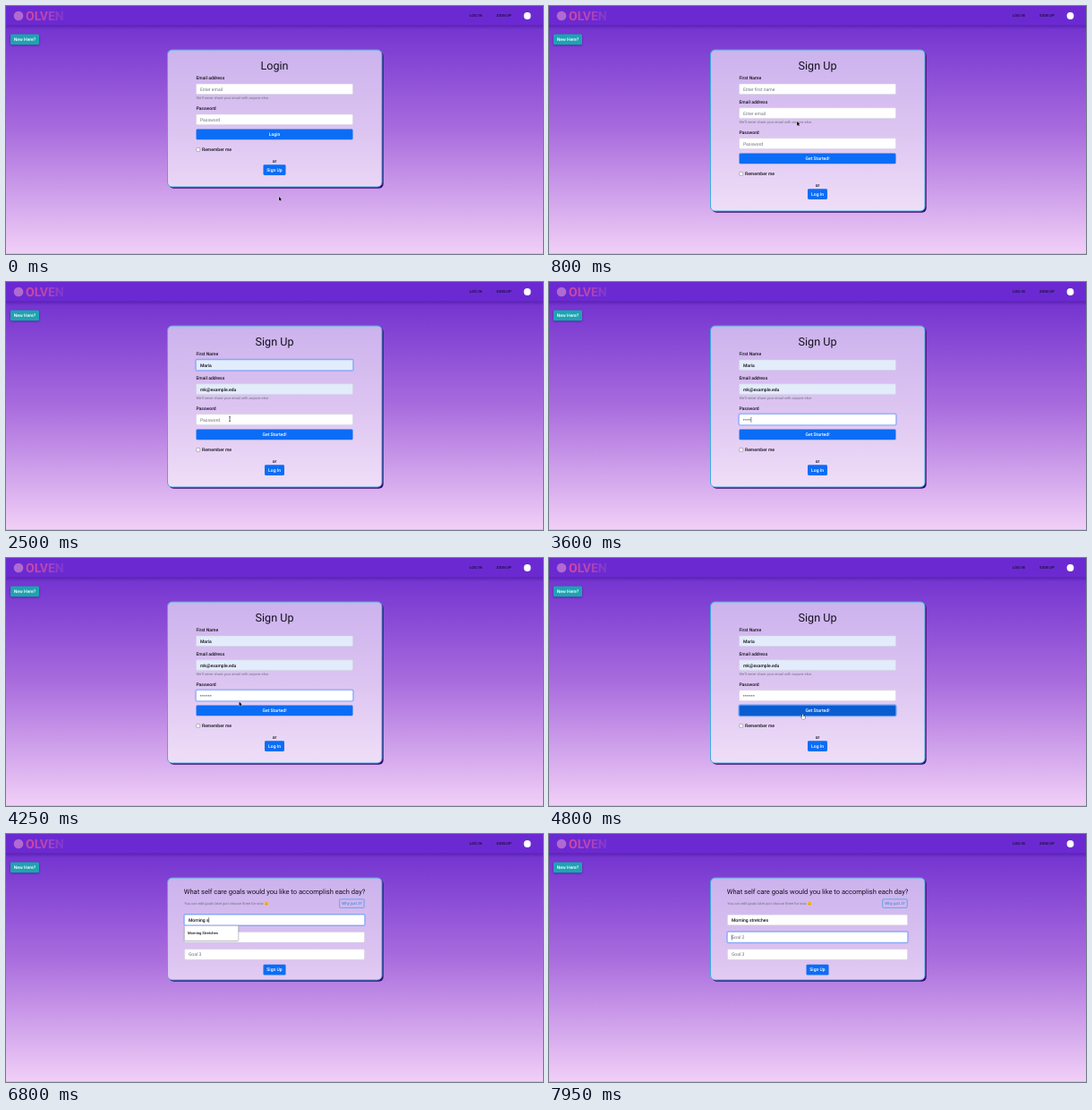
Animation, 600 px wide and 277 px high, one loop 8000 ms. Source, as an HTML page with a canvas:

```html
<!DOCTYPE html>
<html lang="en">
<head>
<meta charset="utf-8">
<title>Sign up flow</title>
<style>
html, body { margin: 0; width: 100%; height: 100%; overflow: hidden; }
canvas { display: block; width: 600px; height: 277px; }
</style>
</head>
<body>
<canvas id="stage"></canvas>
<script>
const W = 600, H = 277, LOOP = 8000;
const REM = 5.04;
const canvas = document.getElementById('stage');
const ctx = canvas.getContext('2d');
const dpr = window.devicePixelRatio || 1;
canvas.width = W * dpr;
canvas.height = H * dpr;
ctx.scale(dpr, dpr);
ctx.textRendering = 'geometricPrecision';

const INK = '#15101c', GREY = '#6c757d', BLUE = '#0b6df5', BLUE_DARK = '#0a58ca';
const AUTOFILL = '#e3ecfb', WHITE = '#fff';

const NAME = 'Maria', EMAIL = 'mk@example.edu';
const GOAL = 'Morning stretches';
const HINTS = ['Morning Stretches', 'Stretch', 'Get pets', 'blah', 'sfd', 'Eat'];

// Times of the user's actions, in ms
const T = {
  signUpPage: 500, nameFocus: 1000, preview: 1200, secondRow: 1400, chosen: 1850,
  passFocus: 2600, passType: 3010, passStep: 180,
  hover: 4400, press: 4600, goalsPage: 4950, goalFocus: 5450,
  goalType: 6000, goalStep: 95, tab: 7750
};

// Pointer stops: time, x, y
const PATH = [
  [0, 305, 213], [300, 301, 184], [600, 301, 184], [950, 262, 94], [1050, 262, 94],
  [1500, 260, 131.5], [1900, 260, 131.5], [2450, 250, 153], [4100, 250, 154],
  [4500, 283, 174.5], [4950, 283, 174.5], [5400, 267.5, 99], [LOOP, 267.5, 99]
];

const backdrop = ctx.createLinearGradient(0, 0, 0, H);
[[0, '#692bd1'], [.1, '#7636d1'], [.5, '#a96cdd'], [1, '#f1d0f7']]
  .forEach(([p, c]) => backdrop.addColorStop(p, c));

const between = (t, a, b) => t >= a && t < b;
const typed = (t, start, step, max) =>
  Math.max(0, Math.min(max, Math.floor((t - start) / step) + 1));
const blink = (t, start) => (t - start) % 1000 < 500;

function rect(x, y, w, h, r, fill, stroke, line = .5) {
  ctx.beginPath();
  ctx.roundRect(x, y, w, h, r);
  if (fill) { ctx.fillStyle = fill; ctx.fill(); }
  if (stroke) { ctx.strokeStyle = stroke; ctx.lineWidth = line; ctx.stroke(); }
}

function disc(x, y, r, fill) {
  ctx.beginPath();
  ctx.arc(x, y, r, 0, 7);
  ctx.fillStyle = fill;
  ctx.fill();
}

// y is the middle of the capitals; returns the width
function text(str, x, y, { size = REM, color = INK, align = 'left', weight = 400, spacing = 0 } = {}) {
  const k = size / 16;
  ctx.save();
  ctx.translate(x, y + size * .355);
  ctx.scale(k, k);
  ctx.font = `${weight} 16px Roboto, sans-serif`;
  ctx.letterSpacing = spacing / k + 'px';
  ctx.textAlign = align;
  ctx.fillStyle = color;
  ctx.fillText(str, 0, 0);
  const width = ctx.measureText(str).width * k;
  ctx.restore();
  return width;
}

function button(label, x, y, w, { fill = BLUE, ring = false } = {}) {
  if (ring) rect(x - .6, y - .6, w + 1.2, 12.8, 1.8, null, 'rgba(110,165,250,.85)', 1.2);
  rect(x, y, w, 11.7, 1.3, fill);
  text(label, x + w / 2, y + 5.8, { color: WHITE, align: 'center', weight: 500 });
}

function input(x, y, w, { value = '', hint = '', focus = false, fill = WHITE, caret = false, dots = 0 } = {}) {
  if (focus) rect(x - .6, y - .6, w + 1.2, 12.8, 1.8, null, 'rgba(80,145,250,.55)', 1.2);
  rect(x, y, w, 11.6, 1.3, fill, focus ? '#79adfa' : '#ced4da');
  const cy = y + 6;
  let end = x + 4.4;
  for (let i = 0; i < dots; i++) disc(x + 5.3 + i * 2.2, cy, .65, INK);
  end += dots * 2.2;
  if (value) end += text(value, x + 4.4, cy, { weight: 500 });
  else if (hint && !dots) text(hint, x + 4.4, cy, { color: GREY });
  if (caret) {
    ctx.fillStyle = INK;
    ctx.fillRect(end, cy - 3, .5, 6);
  }
}

function popup(x, y, w, h) {
  ctx.save();
  ctx.shadowColor = 'rgba(0,0,0,.4)';
  ctx.shadowBlur = 2 * dpr;
  ctx.shadowOffsetY = .6 * dpr;
  rect(x, y, w, h, .8, WHITE);
  ctx.restore();
  rect(x, y, w, h, .8, null, '#b9b3bd', .4);
}

function card(h) {
  const x = 180.5, y = 49, w = 239.5;
  rect(x + 1.7, y + 1.7, w, h, 5, '#3a0b70');
  rect(x, y, w, h, 5, backdrop);
  rect(x, y, w, h, 5, 'rgba(255,255,255,.6)', '#3fb0dc', 1);
}

function chrome() {
  ctx.fillStyle = backdrop;
  ctx.fillRect(0, 0, W, H);
  ctx.fillStyle = '#cfc1d8';
  ctx.fillRect(0, 276, W, 1);

  const shade = ctx.createLinearGradient(0, 21, 0, 26);
  shade.addColorStop(0, 'rgba(50,10,130,.45)');
  shade.addColorStop(1, 'rgba(50,10,130,0)');
  ctx.fillStyle = shade;
  ctx.fillRect(0, 21, W, 5);
  ctx.fillStyle = '#6b2ad1';
  ctx.fillRect(0, 0, W, 21.5);

  disc(14, 11, 5.3, '#b06ad0');
  const ink = ctx.createLinearGradient(0, 0, 45, 0);
  ink.addColorStop(0, '#d0489f');
  ink.addColorStop(.6, '#b545b4');
  ink.addColorStop(1, '#8238cf');
  text('OLVEN', 22, 11, { size: 14, weight: 700, color: ink });

  const nav = { size: 4.2, weight: 500, color: '#170a33', spacing: .1 };
  text('LOG IN', 518, 11, nav);
  text('SIGN UP', 548, 11, nav);
  disc(582.5, 11, 3.9, WHITE);

  ctx.save();
  ctx.shadowColor = 'rgba(30,0,90,.5)';
  ctx.shadowBlur = 2.5 * dpr;
  ctx.shadowOffsetY = .8 * dpr;
  rect(5, 31.5, 32, 11.8, 1.4, '#1ea3b2');
  ctx.restore();
  text('New Here?', 21, 37.4, { color: WHITE, align: 'center', weight: 500 });
}

const heading = str => text(str, 300, 66.5, { size: 12.6, align: 'center' });
const label = (str, y) => text(str, 212.4, y, { weight: 500 });
const privacy = y => text("We'll never share your email with anyone else.", 212.4, y,
  { size: 4.03, color: GREY });

function formEnd(y, swap, x, w, hover) {
  rect(212.7, y - 2.1, 4, 4, .8, WHITE, '#77717c', .5);
  text('Remember me', 219, y, { weight: 500 });
  text('or', 300, y + 12.7, { align: 'center', weight: 500 });
  button(swap, x, y + 16.7, w, { fill: hover ? BLUE_DARK : BLUE });
}

function loginPage(t) {
  card(153);
  heading('Login');
  label('Email address', 80.3);
  input(212.5, 87, 175, { hint: 'Enter email' });
  privacy(102.5);
  label('Password', 114.3);
  input(212.5, 121, 175, { hint: 'Password' });
  button('Login', 212.5, 137.6, 175);
  formEnd(160.5, 'Sign Up', 287.5, 25, t > 250);
}

function accountList(t) {
  popup(212.5, 99, 67.5, 83.5);
  const second = t >= T.secondRow;
  if (t >= T.preview) {
    ctx.fillStyle = '#c3bfc1';
    ctx.fillRect(212.5, second ? 119.5 : 101.5, 67.5, 17.8);
  }
  const main = { size: 4.1, weight: 500 }, sub = { size: 3.75 };
  text(NAME, 216.3, 107.2, main);
  text('MARIALUNDVE@EXAMPLE.COM', 216.3, 113.5, sub);
  text(NAME, 216.3, 125.3, main);
  text(EMAIL, 216.3, 131.6, sub);
  text('Ingrid', 216.3, 143.3, main);
  text('Oliver', 216.3, 155, main);
  text('oliverbr74@example.com', 216.3, 161.2, sub);
  ctx.fillStyle = '#d2ccd4';
  ctx.fillRect(212.5, 169, 67.5, .5);
  text('Manage...', 216.3, 176.2, { size: 4.1 });
}

function signUpPage(t) {
  const filled = t >= T.preview, done = t >= T.chosen;
  const tint = filled ? AUTOFILL : WHITE;
  const nameFocus = between(t, T.nameFocus, T.passFocus);
  const passFocus = between(t, T.passFocus, T.press);
  const dots = typed(t, T.passType, T.passStep, 6);
  const typing = between(t, T.passType, T.passType + 6 * T.passStep);

  card(180);
  heading('Sign Up');
  label('First Name', 80.3);
  input(212.5, 87, 175, {
    value: filled ? NAME : '', hint: 'Enter first name', fill: tint, focus: nameFocus,
    caret: nameFocus && (!filled || done) && blink(t, T.nameFocus)
  });
  label('Email address', 107.3);
  input(212.5, 113.8, 175, { value: filled ? EMAIL : '', hint: 'Enter email', fill: tint });
  privacy(129.6);
  label('Password', 141.2);
  input(212.5, 147.8, 175, {
    hint: 'Password', dots, focus: passFocus,
    caret: passFocus && (typing || blink(t, T.passFocus))
  });
  button('Get Started!', 212.5, 164.5, 175, {
    fill: t >= T.hover ? '#0b5cd0' : BLUE, ring: t >= T.press
  });
  formEnd(187.5, 'Log In', 289, 22, false);
  if (between(t, T.nameFocus, T.chosen)) accountList(t);
}

function smile(x, y) {
  disc(x, y, 2.5, '#f5c242');
  disc(x - .8, y - .5, .35, '#6b4312');
  disc(x + .8, y - .5, .35, '#6b4312');
  ctx.beginPath();
  ctx.arc(x, y + .2, 1.2, .3, 2.8);
  ctx.strokeStyle = '#8a4c1c';
  ctx.lineWidth = .4;
  ctx.stroke();
}

function goalsPage(t) {
  const count = typed(t, T.goalType, T.goalStep, GOAL.length);
  const first = between(t, T.goalFocus, T.tab), second = t >= T.tab;

  card(114);
  text('What self care goals would you like to accomplish each day?', 300, 64.7,
    { size: 7.56, align: 'center' });
  text('You can edit goals later just choose three for now', 199.3, 77.2,
    { size: 4.03, color: GREY });
  smile(291, 77.4);
  rect(372.7, 72.8, 27.5, 9.6, 1, null, '#2f96dc', .6);
  text('Why just 3?', 386.5, 77.6, { size: 4.41, color: '#2386d8', align: 'center' });

  input(199.5, 90.2, 201, {
    value: GOAL.slice(0, count), hint: 'Morning stretches...', focus: first,
    caret: first && (count > 0 || blink(t, T.goalFocus))
  });
  input(199.5, 109.5, 201, { hint: 'Goal 2', focus: second, caret: second && blink(t, T.tab) });
  input(199.5, 128.7, 201, { hint: 'Goal 3' });
  button('Sign Up', 287.5, 145.8, 25);

  if (first) {
    const rows = HINTS.filter(h => h.toLowerCase().startsWith(GOAL.slice(0, count).toLowerCase()));
    popup(199.5, 102.4, 60, 5 + rows.length * 11.3 + (rows.length > 1 ? 0 : .3));
    rows.forEach((row, i) => text(row, 203, 110.6 + i * 11.3, { size: 4.1, weight: 500 }));
  }
}

function pointerAt(t) {
  const i = PATH.findIndex((p, n) => n && t < p[0]);
  const [t0, x0, y0] = PATH[i - 1], [t1, x1, y1] = PATH[i];
  const u = (t - t0) / (t1 - t0), e = u * u * (3 - 2 * u);
  return [x0 + (x1 - x0) * e, y0 + (y1 - y0) * e];
}

const SHAPES = {
  arrow: [[0, 0], [0, 4.6], [1.1, 3.6], [1.8, 5.1], [2.5, 4.8], [1.8, 3.3], [3.2, 3.2]],
  hand: [[0, 0], [.9, 0], [1, 2], [3.2, 2.5], [3, 4.6], [2.5, 5.4], [.3, 5.4], [-1.3, 3.2], [-.8, 2.7], [0, 3.4]]
};

function pointer(t) {
  if (between(t, 2900, 4050) || t >= T.goalType) return;
  const [x, y] = pointerAt(t);
  const hand = between(t, 250, T.signUpPage) || between(t, T.hover, T.goalsPage);
  const beam = between(t, 900, 1080) || between(t, 2350, 2900) ||
    between(t, 4050, 4250) || t >= 5300;
  ctx.save();
  ctx.translate(x, y);
  if (beam) {
    ctx.fillStyle = '#111';
    ctx.fillRect(-.3, -2.4, .6, 4.8);
    ctx.fillRect(-1, -2.6, 2, .5);
    ctx.fillRect(-1, 2.1, 2, .5);
  } else {
    ctx.beginPath();
    SHAPES[hand ? 'hand' : 'arrow'].forEach(p => ctx.lineTo(...p));
    ctx.closePath();
    ctx.lineWidth = .7;
    ctx.lineJoin = 'round';
    ctx.strokeStyle = hand ? '#111' : 'rgba(255,255,255,.8)';
    ctx.stroke();
    ctx.fillStyle = hand ? WHITE : '#000';
    ctx.fill();
  }
  ctx.restore();
}

function draw(t) {
  chrome();
  if (t < T.signUpPage) loginPage(t);
  else if (t < T.goalsPage) signUpPage(t);
  else goalsPage(t);
  pointer(t);
}

const start = performance.now();
function tick() {
  draw((performance.now() - start) % LOOP);
  requestAnimationFrame(tick);
}
tick();
</script>
</body>
</html>
```
